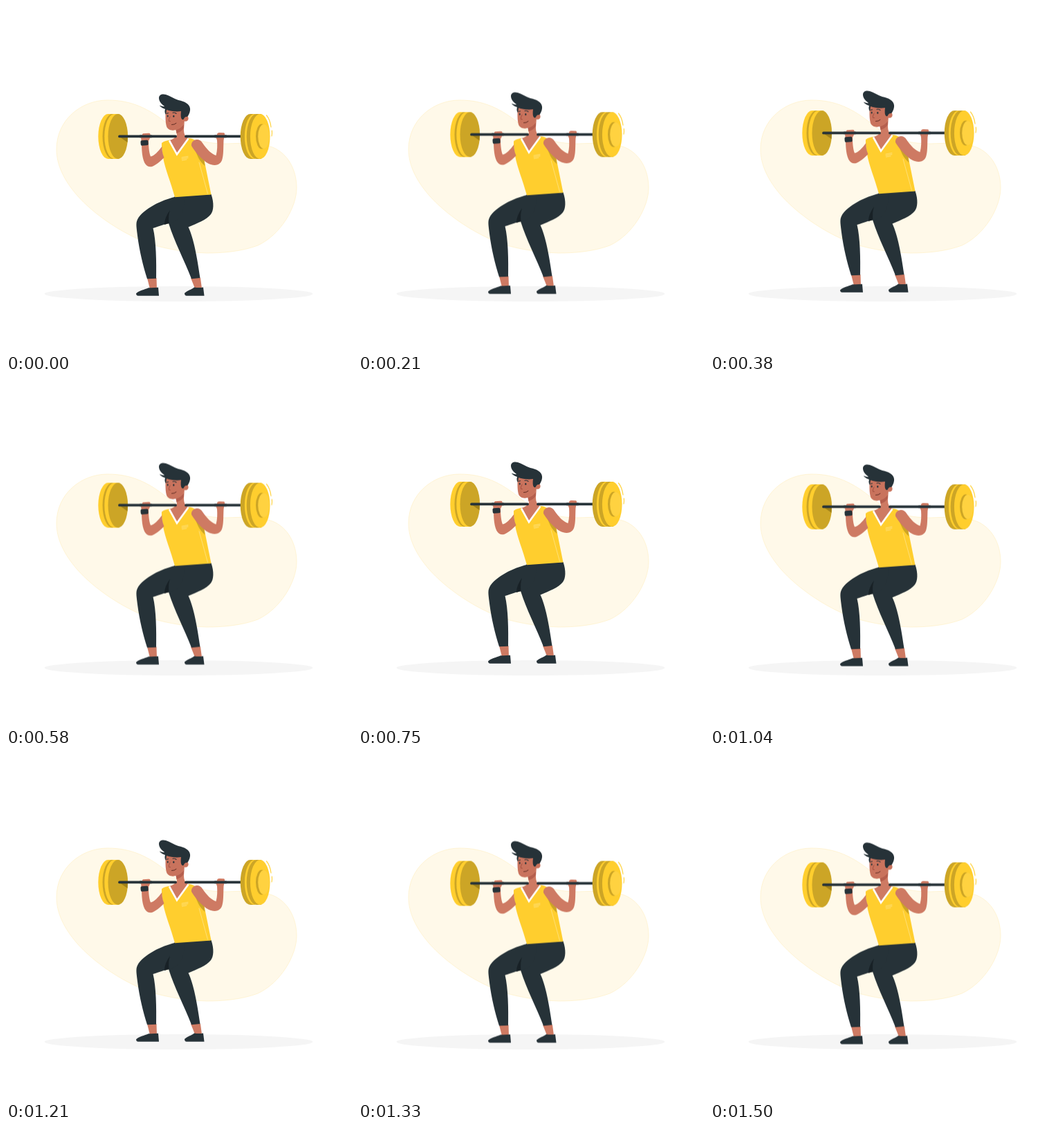
Recreate the animation shown at these times as an HTML page. Size 500 by 500 pixels, loop 1540 ms.

```html
<!DOCTYPE html>
<html lang="en">
<head>
<meta charset="utf-8">
<title>Barbell squat</title>
<style>
  html, body { margin: 0; width: 100%; height: 100%; overflow: hidden; background: #fff; }
  svg { display: block; width: 100%; height: 100%; }
  .lifter { animation: lift 1540ms linear -45ms infinite; }
  @keyframes lift {
    0%, 100% { transform: translateY(.6px); }
    50% { transform: translateY(-9.4px); }
  }
  .yellow { fill: #ffce2e; }
  .gold { fill: #cca526; }
  .dark { fill: #263238; }
  .skin { fill: #ce7a63; }
  .face { fill: #c9735d; }
  .shade { fill: #b55f4e; }
  .line { fill: none; stroke-linecap: round; stroke-linejoin: round; }
</style>
</head>
<body>
<svg viewBox="0 0 500 500">
  <defs>
    <ellipse id="disc" rx="14.3" ry="32.5"/>
    <path id="rim" d="M0-32.5H7V32.5H0A14.3 32.5 0 0 1 0-32.5Z"/>
  </defs>

  <path fill="#fff9e9" stroke="#ffefc0" stroke-width=".6" d="M73 207C73 165 108 136 147 136C182 136 207 149 232 169C258 191 285 199 318 199C345 198 365 197 385 204C407 213 420 236 420 263C420 290 398 330 364 346C340 355 312 357 290 357C262 356 235 352 212 345C170 331 128 302 103 274C84 252 73 230 73 207Z"/>
  <ellipse cx="249.5" cy="416" rx="193.8" ry="11" fill="#f5f5f5"/>

  <g class="lifter">
    <!-- left plates -->
    <g transform="translate(147.6 188.5)">
      <use href="#rim" class="yellow"/>
      <use href="#disc" x="6.2" class="gold"/>
      <use href="#rim" x="9" class="yellow"/>
      <use href="#disc" x="14.2" class="gold"/>
    </g>
    <path fill="#a08018" d="M164 189H175.8L175.5 197Z"/>

    <!-- feet -->
    <path class="skin" d="M204 393H217.5L218 409H208ZM267 393H281L283 408H273Z"/>
    <path class="dark" d="M188 415.5C192 411 200 410 206 407.2Q213 407.5 220 406.8L221 418.8H191Q188 418.5 188 415.5ZM258 415C262 411 268 410 272 406.5Q279 407.5 285 406.5L286.5 418.8H261Q258 418.5 258 415Z"/>

    <!-- legs -->
    <path class="dark" d="M240 280L244 275L296.5 272C301 285 300 296 296 301C290 309 276 314 263.5 319.5C271 335 276 362 280.5 393L268 394.3C258 368 243 340 235 314Z"/>
    <path class="dark" d="M244 276C226 280 198 293 190 308.5C187 314 189 322 190 332C193 355 198 375 204 394.3L217 393.8C217.5 370 217 340 212.5 321C222 318 230 315 236 314C250 312 258 300 258 276Z"/>
    <path fill="#182126" d="M237 295C232 302 229 309 229 316L235.5 314Q234 304 237 295Z"/>

    <!-- bar -->
    <path class="skin" d="M245 176L247 186C245 190 241 193 236 194L247 216L264 191C259 189 257 186 257 178L258 165Z"/>
    <path class="line" stroke="#263238" stroke-width="3.8" d="M164 188.4H245M260 188.4H342"/>

    <!-- right plates -->
    <g transform="translate(353 188.5)">
      <use href="#rim" class="gold"/>
      <use href="#disc" x="6.2" class="yellow"/>
      <use href="#rim" x="9" class="gold"/>
      <use href="#disc" x="14.2" class="yellow"/>
      <ellipse cx="16.4" rx="8.4" ry="18" class="gold"/>
      <ellipse cx="19.4" rx="8.2" ry="17.6" fill="#ffd240"/>
    </g>
    <path class="line" stroke="#ffd445" stroke-width="1.2" d="M376.5 158Q381.5 164 383 175M384.3 180Q384.8 184 384 188"/>

    <!-- torso -->
    <path class="shade" d="M245.5 179C250 178 254 175 257 171V176C254 181 250 183 246.5 184Z"/>
    <path class="yellow" d="M225 198C229 195 233 194 236.5 194L247 214L263 191C269 191 275 194 279 199L286.5 223L296.5 272.5L244 276.3C238 254 230 236 227 219L225 205Z"/>
    <path class="line" stroke="#fff" stroke-width="2.6" style="stroke-linecap:butt;stroke-linejoin:miter" d="M236 194.5L247 214.3L263.5 191.5"/>
    <path class="gold" d="M273 207C277 219 281 226 287.5 231L286 221Z"/>
    <path class="line" stroke="#ffe27d" stroke-width=".9" d="M279 226L291.5 271M254 219L263 217.3M254 221L263 219.3M254.5 223L261 221.8"/>

    <!-- arms -->
    <path class="skin" d="M196 198C196 214 198 227 204 231C210 235 217 230 228.500 219Q225 211 225.500 203C220 210 214 217 209 217.500C207 213 206 205 206 195L208.500 190V185Q208 183.500 206 183.700L198 184.200Q196.500 185 197 187L195 190Z"/>
    <rect class="dark" x="194.6" y="194" width="11" height="7.6" rx="2" transform="rotate(-4 200 198)"/>
    <path class="skin" d="M268 202C267 193 279 189 284 198C290 207 297 214 303.500 216C305.500 209 305.500 201 305 194L303.500 190L305.500 184Q307 182.700 309 183L315 183.300Q316.500 184 316 186L314.500 194C314 206 314.500 216 312 223C309 230 303 231 296 229C288 227 275 214 268 202Z"/>
    <path class="line" stroke="#263238" stroke-width="3.8" d="M194 188.4H210M302 188.4H318"/>

    <!-- head -->
    <path class="face" d="M231 151C230 160 230.5 169 232 174C234 179.5 240 180.5 245 179C251 177 255 173 257 168V150L232 147Z"/>
    <ellipse class="face" cx="259.4" cy="162.4" rx="4.2" ry="4.3"/>
    <path class="dark" d="M221 133C221 128 226 126.5 231 128C237 130 243 134 249 136C258 138 265 141 266 148C266.5 153 264 158 262 160C259 159.5 258 161 256.5 164C253 165 252 160 253 152C246 153 238 152 232 150L231 157Q228.5 154 230 149C227 148 223 146 222 143.5C225 145 228 145.500 229 145C225 142 221 138 221 133Z"/>
    <g class="dark">
      <ellipse cx="233.7" cy="159" rx="1" ry="1.5"/>
      <ellipse cx="242.3" cy="159.3" rx="1.1" ry="1.5"/>
    </g>
    <path class="line" stroke="#263238" stroke-width="1.1" d="M232 155.3L234.5 154.7M241 154.3Q244 153.5 246 155.5"/>
    <path class="line" stroke="#9c4a3b" stroke-width=".8" d="M237 160Q234.500 165 235.500 166.500L237.500 166.500"/>
    <path class="line" stroke="#53241d" stroke-width=".9" d="M239.5 171.500Q243.500 171.800 246 169.300"/>
  </g>
</svg>
</body>
</html>
```
